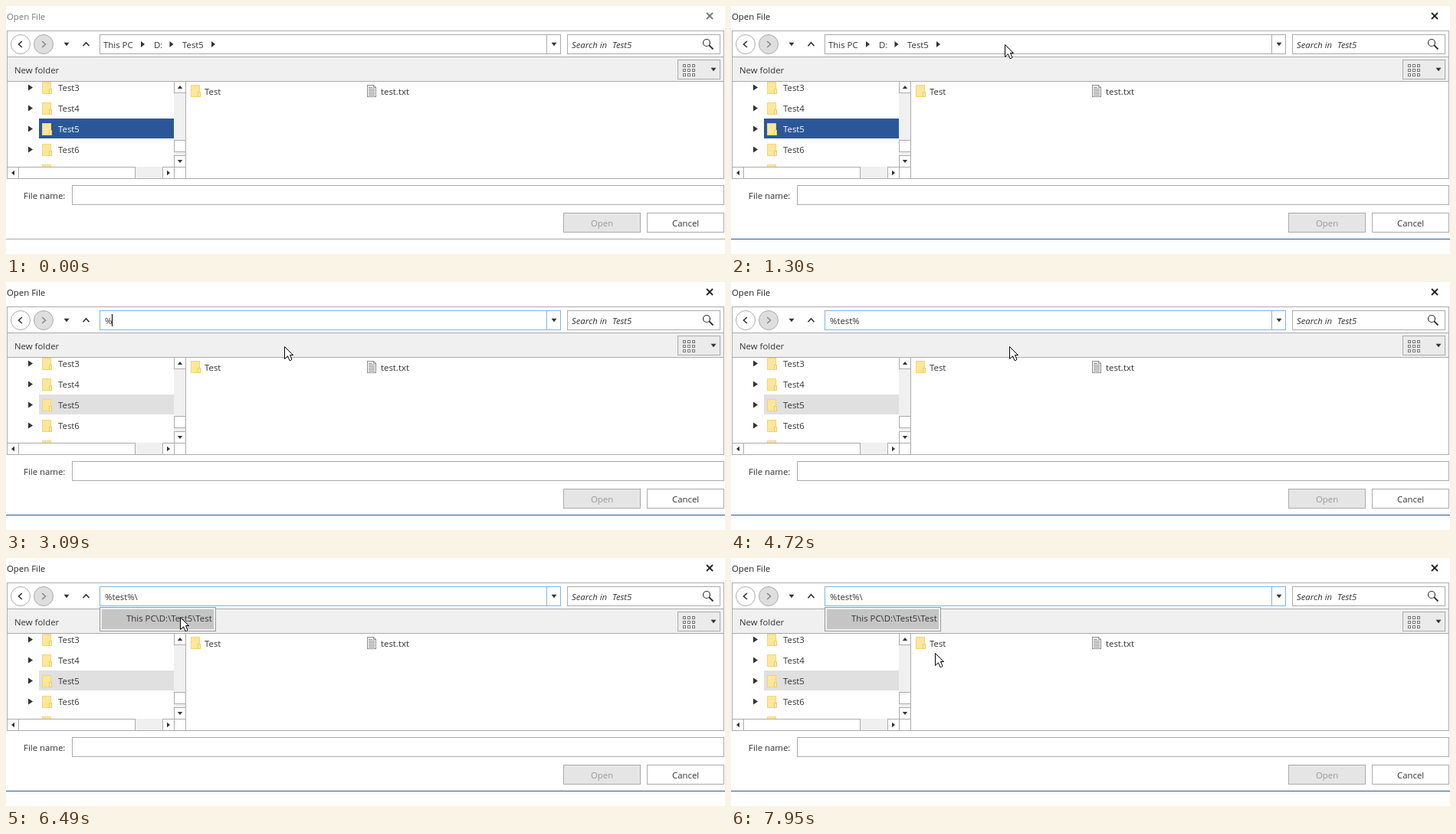
These frames come from a looping animation (938 px wide and 324 px high, 8000 ms). An HTML page with a canvas:

```html
<!DOCTYPE html>
<html lang="en">
<head>
<meta charset="utf-8">
<title>Open File</title>
<style>
html, body { margin: 0; width: 100%; height: 100%; overflow: hidden; background: #fff; }
canvas { display: block; }
</style>
</head>
<body>
<canvas id="stage" width="938" height="324"></canvas>
<script>
const ctx = document.getElementById('stage').getContext('2d');
const LOOP = 8000, TICK = 77, BLINK = 535;
const ACTIVATE = 680, EDIT = 1450, POPUP = 4950, HOVER = 5940;
const FONT = '11.4px "Open Sans", "Noto Sans", sans-serif';
const INK = '#333', EDGE = '#ababab', PANEL = '#f0f0f0', BLUE = '#2b579a';

// Pointer glides: each one starts where the one before ended
const ENTRY = { x: 400, y: 310 };
const GLIDES = [
  { start: 140, end: 610, x: 346, y: 31 },
  { start: 910, end: 1070, x: 357, y: 50 },
  { start: 1770, end: 1850, x: 363, y: 84 },
  { start: 5790, end: 5950, x: 232, y: 69 },
  { start: 6030, end: 6260, x: 220, y: 70 },
  { start: 6340, end: 7020, x: 289, y: 135 },
  { start: 7100, end: 7250, x: 311, y: 134 },
  { start: 7330, end: 7490, x: 300, y: 124 },
  { start: 7640, end: 7800, x: 239, y: 122 },
  { start: 7880, end: 7950, x: 266, y: 124 }
];

const TYPED = '%test%\\';
const KEYS = [2930, 3620, 3620, 3790, 3860, 4170, 4870];

function fill(x, y, w, h, color) {
  ctx.fillStyle = color;
  ctx.fillRect(x, y, w, h);
}

function box(x, y, w, h, color, edge = EDGE) {
  fill(x, y, w, h, edge);
  fill(x + 1, y + 1, w - 2, h - 2, color);
}

function text(s, x, y, color = INK, style = '') {
  ctx.font = style + FONT;
  ctx.fillStyle = color;
  ctx.fillText(s, x, y);
}

function line(points, width, color) {
  ctx.beginPath();
  points.forEach(p => ctx.lineTo(...p));
  ctx.lineWidth = width;
  ctx.strokeStyle = color;
  ctx.stroke();
}

function circle(x, y, r, edge, color, width = 1) {
  ctx.beginPath();
  ctx.arc(x, y, r, 0, 7);
  ctx.fillStyle = color;
  ctx.fill();
  ctx.lineWidth = width;
  ctx.strokeStyle = edge;
  ctx.stroke();
}

// Solid triangle centred on x, y: half base b, half depth d, turned by quarters
function triangle(x, y, b, d, quarter) {
  ctx.save();
  ctx.translate(x, y);
  ctx.rotate(quarter * Math.PI / 2);
  ctx.beginPath();
  ctx.moveTo(-d, -b);
  ctx.lineTo(d, 0);
  ctx.lineTo(-d, b);
  ctx.fillStyle = INK;
  ctx.fill();
  ctx.restore();
}

const dropMark = (x, y) => triangle(x, y, 3.5, 2.2, 1);

function chevron(x, y, dx, dy, color) {
  const points = dx ? [[x - dx, y - 4], [x + dx, y], [x - dx, y + 4]]
                    : [[x - 4, y - dy], [x, y + dy], [x + 4, y - dy]];
  line(points, 1.6, color);
}

function folder(x, y) {
  box(x, y, 12, 16, '#ffe699', '#f3d37a');
  box(x + 9, y + 9, 4, 7, '#ffeab0', '#eccb6a');
}

function sheet(x, y) {
  box(x, y, 12, 16, '#fff', '#8a8a8a');
  for (let i = 0; i < 6; i++) fill(x + 2, y + 3 + i * 2, i ? 8 : 5, 1, '#8a8a8a');
  fill(x + 9, y, 3, 3, '#fff');
  line([[x + 8.5, y + .5], [x + 8.5, y + 3.5], [x + 11.5, y + 3.5], [x + 8.5, y + .5]], 1, '#8a8a8a');
}

function titleBar(active) {
  const color = active ? '#222' : '#777';
  text('Open File', 1, 18, color);
  line([[914, 9], [922, 17]], 1.8, color);
  line([[922, 9], [914, 17]], 1.8, color);
  fill(0, 304, 938, 1, active ? BLUE : EDGE);
}

function navigation() {
  box(1, 32, 936, 194, '#fff');
  circle(19, 50, 12.5, EDGE, '#fff');
  circle(49, 50, 12.5, EDGE, '#dedede');
  chevron(18.7, 50, -2.2, 0, INK);
  chevron(49.3, 50, 2.2, 0, '#8a8a8a');
  dropMark(79, 50);
  chevron(104.5, 50, 0, -2.2, INK);

  box(732, 37, 200, 26, '#fff');
  text('Search in', 738, 55, INK, 'italic ');
  text('Test5', 791, 55, INK, 'italic ');
  line([[917, 51], [922.5, 56.5]], 1.8, INK);
  circle(914, 48, 4.5, INK, '#fff', 1.2);
}

function address(t) {
  const editing = t >= EDIT;
  const edge = editing ? '#7eb4ea' : EDGE;
  box(122, 37, 602, 26, '#fff', edge);
  fill(705, 37, 1, 26, edge);
  dropMark(715, 50);
  if (!editing) {
    text('This PC', 127, 55);
    text('D:', 193, 55);
    text('Test5', 230, 55);
    [178.5, 216, 270.5].forEach(x => triangle(x, 50, 4, 2.5, 0));
    return;
  }
  const count = KEYS.filter(k => k <= t).length;
  if (!count) {
    fill(129, 42, 43, 16, '#99c9ef');
    text('D:\\Test5', 129, 55, '#1f5077');
    return;
  }
  const typed = TYPED.slice(0, count);
  text(typed, 129, 55);
  const caretOn = Math.floor((t - KEYS[count - 1]) / BLINK) % 2 === 0;
  if (caretOn) fill(Math.round(129 + ctx.measureText(typed).width), 42, 1, 16, '#000');
}

function toolbar() {
  box(1, 66, 936, 33, PANEL);
  text('New folder', 11, 88);
  box(876, 70, 56, 26, '#ebebeb');
  for (let i = 0; i < 9; i++) {
    box(883 + i % 3 * 6, 76 + Math.floor(i / 3) * 6, 4, 4, '#fff', '#777');
  }
  dropMark(923, 83);
}

function tree(editing) {
  ctx.save();
  ctx.beginPath();
  ctx.rect(2, 99, 217, 111);
  ctx.clip();
  fill(43, 147, 176, 26, editing ? '#e0e0e0' : BLUE);
  for (let i = 0; i < 5; i++) {
    const y = 106 + i * 27;
    triangle(32, y + .5, 4, 3, 0);
    folder(47, y - 7);
    text('Test' + (i + 3), 68, y + 5, i === 2 && !editing ? '#fff' : INK);
  }
  ctx.restore();

  fill(219, 99, 15, 111, PANEL);
  [98, 175, 195].forEach(y => box(219, y, 16, 16, '#fff'));
  triangle(227, 106, 3.2, 2, 3);
  triangle(227, 203, 3.2, 2, 1);
  fill(2, 210, 217, 15, PANEL);
  box(1, 210, 16, 16, '#fff');
  box(16, 210, 153, 16, '#fff');
  box(204, 210, 16, 16, '#fff');
  triangle(9, 218, 3.2, 2, 2);
  triangle(212, 218, 3.2, 2, 0);
  fill(234, 98, 1, 128, EDGE);
}

function filesAndButtons() {
  folder(241, 103);
  text('Test', 259, 116);
  sheet(471, 103);
  text('test.txt', 489, 116);
  text('File name:', 23, 252);
  box(86, 234, 851, 26, '#fff');
  box(727, 270, 101, 26, '#e5e5e5');
  box(836, 270, 101, 26, '#fff');
  text('Open', 763, 288, '#999');
  text('Cancel', 869, 288);
}

function popup(hover) {
  box(122, 64, 152, 32, PANEL, '#999');
  if (hover) fill(125, 67, 146, 26, '#c5c5c5');
  text('This PC\\D:\\Test5\\Test', 157, 83);
}

// The pointer is seen at even ticks, so each glide advances in steps
function pointerAt(t) {
  const i = GLIDES.filter(g => g.start <= t).length - 1;
  if (i < 0) return null;
  const to = GLIDES[i], from = GLIDES[i - 1] || ENTRY;
  const span = to.end - to.start;
  const ticks = Math.round(span / TICK);
  const passed = Math.floor((t - to.start) / span * ticks + 1e-6);
  const u = Math.min(1, (passed + 1) / (ticks + 1));
  const eased = u * u * (3 - 2 * u);
  return ['x', 'y'].map(k => Math.round(from[k] + (to[k] - from[k]) * eased));
}

const ARROW = new Path2D('M.5 .5L11.5 11.5H7.5L10 17L8.5 18.5H7L4.5 12.8L.5 16.5Z');

function textPointer(x, y) {
  fill(x, y + 1, 1, 14, '#000');
  [y, y + 15].forEach(end => {
    fill(x - 3, end, 3, 1, '#000');
    fill(x + 1, end, 3, 1, '#000');
  });
}

function pointer(t) {
  const p = pointerAt(t);
  if (!p) return;
  if (t >= EDIT && t < GLIDES[2].start) return textPointer(p[0] + 1, p[1] - 7);
  ctx.save();
  ctx.translate(...p);
  ctx.fillStyle = '#fff';
  ctx.fill(ARROW);
  ctx.lineWidth = 1;
  ctx.strokeStyle = '#000';
  ctx.stroke(ARROW);
  ctx.restore();
}

function draw(now) {
  const t = now % LOOP;
  fill(0, 0, 938, 324, '#fff');
  titleBar(t >= ACTIVATE);
  navigation();
  address(t);
  toolbar();
  tree(t >= EDIT);
  filesAndButtons();
  if (t >= POPUP) popup(t >= HOVER);
  pointer(t);
  requestAnimationFrame(draw);
}
requestAnimationFrame(draw);
</script>
</body>
</html>
```
